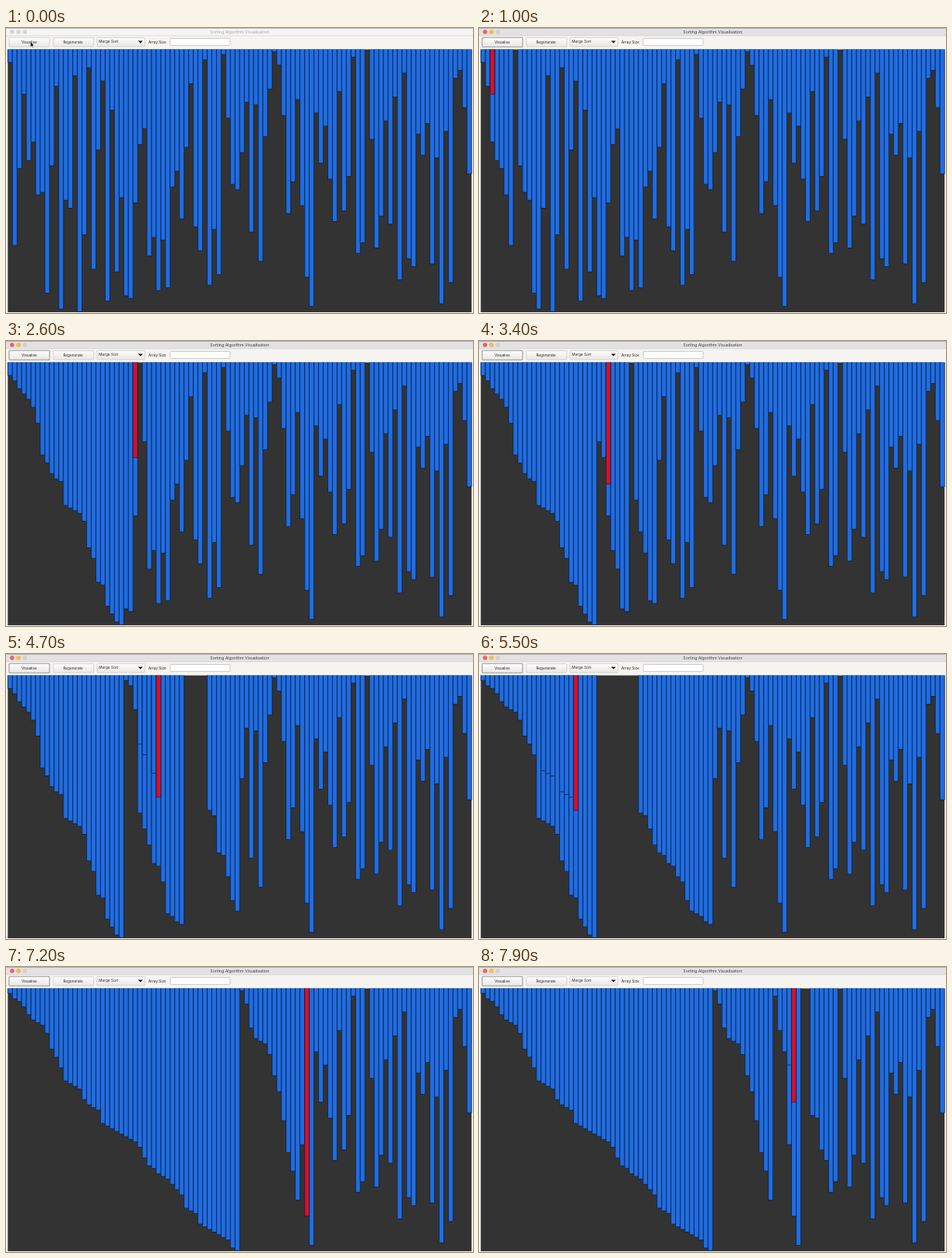
An HTML page with a canvas for the animation above (8 s loop, 600x366 px).

```html
<!DOCTYPE html>
<html lang="en">
<head>
<meta charset="utf-8">
<title>Sorting Algorithm Visualisation</title>
<style>
  html, body { margin: 0; width: 100%; height: 100%; overflow: hidden; background: #f3f2f0; }
  svg, canvas { position: absolute; left: 0; top: 0; width: 600px; height: 366px; display: block; }
  text { font: 4.7px Inter, Roboto, sans-serif; fill: #222; }
  .title { font-size: 5.25px; text-anchor: middle; fill: #3c3c3c; }
  .mid { text-anchor: middle; }
  .btn { fill: url(#face); stroke: #c9c8c6; stroke-width: .7; }
  .idle .title { fill: #a5a5a5; }
  .idle .lights circle { fill: #d6d5d6; stroke: #c4c3c4; }
  .idle #bar { fill: #f6f5f6; }
  .focus #go { stroke: #999; stroke-width: 1.1; }
  .away #cursor { display: none; }
</style>
</head>
<body>
<svg id="win" viewBox="0 0 600 366">
  <linearGradient id="face" x2="0" y2="1">
    <stop stop-color="#fdfdfd"/><stop offset="1" stop-color="#e8e7e5"/>
  </linearGradient>
  <rect width="600" height="366" fill="#f5f4f1"/>
  <rect id="bar" width="600" height="10" fill="#e3e1e3"/>
  <path d="M0 .3H600" stroke="#777" stroke-width=".6"/>
  <path d="M0 10H600" stroke="#cfcdcf" stroke-width=".6"/>
  <g class="lights" stroke-width=".4">
    <circle cx="7.8" cy="5" r="2.5" fill="#fc5b57" stroke="#df4744"/>
    <circle cx="16" cy="5" r="2.5" fill="#fdbc40" stroke="#dea035"/>
    <circle cx="24.2" cy="5" r="2.5" fill="#d3d1d3" stroke="#c3c1c3"/>
  </g>
  <text class="title" x="300.3" y="7">Sorting Algorithm Visualisation</text>
  <rect id="go" class="btn" x="4" y="12.2" width="52" height="12" rx="1"/>
  <text class="mid" x="29.8" y="19.9">Visualise</text>
  <rect class="btn" x="60.8" y="12.6" width="52" height="11.4" rx="1"/>
  <text class="mid" x="86.1" y="19.9">Regenerate</text>
  <rect class="btn" x="117" y="12.4" width="61.5" height="11.4" rx="1"/>
  <text x="119.3" y="19.4">Merge Sort</text>
  <path d="M169.7 16.4h6l-3 3z" fill="#111"/>
  <text x="183" y="19.9">Array Size</text>
  <rect x="211" y="13.4" width="77" height="9" rx="1" fill="#fff" stroke="#bbb" stroke-width=".8"/>
  <path id="cursor" d="M31.4 17.6v7l1.7-1.5 1 2.2 1-.5-1-2.1h2.2z" fill="#111" stroke="#fff" stroke-width=".4"/>
</svg>
<canvas id="plot" width="600" height="366"></canvas>
<script>
// The array being sorted; every later bar position follows from it
const values = [
  5, 74, 45, 17, 42, 35, 55, 54, 92, 44, 14, 98, 57, 60, 10, 99, 70, 7, 83, 38,
  12, 95, 23, 84, 56, 93, 94, 58, 36, 30, 78, 71, 91, 72, 90, 52, 46, 64, 37, 13,
  67, 76, 4, 89, 68, 85, 2, 26, 51, 53, 39, 20, 69, 21, 80, 33, 15, 1, 6, 25,
  62, 50, 19, 59, 86, 97, 24, 43, 29, 49, 65, 16, 61, 48, 3, 77, 73, 0, 34, 75,
  63, 27, 66, 18, 87, 9, 79, 82, 32, 40, 28, 81, 41, 96, 31, 88, 11, 8, 22, 47];
// [time in ms, merge writes done]
const pace = [[300, 0], [1800, 84], [3400, 157], [5500, 257], [6400, 296], [7900, 372]];
const pauses = [500, 1200, 2100];
const LOOP = 8000, TICK = 100;
const LEFT = 2.3, TOP = 27.5, BOTTOM = 365, STEP = 5.959, UNIT = 3.405, BASE = 27.2;
const BLUE = '#206de2', RED = '#d4112b', EDGE = '#0a1a36';

const win = document.getElementById('win');
const ctx = document.getElementById('plot').getContext('2d');

// One state per write: bars still waiting (low) and bars already placed (top)
const states = [{ low: values, top: [], marks: [], red: -1 }];
const list = values.slice();

function sort(lo, hi) {
  if (lo >= hi) return;
  const mid = (lo + hi) >> 1;
  sort(lo, mid);
  sort(mid + 1, hi);
  const low = list.slice(), top = [], marks = [];
  let i = lo, j = mid + 1;
  for (let k = lo; k <= hi; k++) {
    const from = j > hi || (i <= mid && list[i] < list[j]) ? i++ : j++;
    low[from] = 0;
    top[k] = list[from];
    marks[k] = states.length % 4 !== 1;
    states.push({ low: low.slice(), top: top.slice(), marks: marks.slice(), red: k });
  }
  for (let k = lo; k <= hi; k++) list[k] = top[k];
}
sort(0, values.length - 1);

function writesAt(t) {
  const n = pace.findIndex(p => p[0] >= t);
  if (n < 1) return 0;
  const [t0, w0] = pace[n - 1], [t1, w1] = pace[n];
  return Math.round(w0 + (w1 - w0) * (t - t0) / (t1 - t0));
}

function bar(i, v, color) {
  if (!v) return;
  const x = LEFT + i * STEP, y = BASE + UNIT * v;
  ctx.fillStyle = color;
  ctx.fillRect(x, TOP, STEP, y - TOP);
  ctx.beginPath();
  ctx.moveTo(x, TOP);
  ctx.lineTo(x, y);
  ctx.lineTo(x + STEP, y);
  ctx.lineTo(x + STEP, TOP);
  ctx.stroke();
}

function draw(s) {
  ctx.clearRect(0, 0, 600, 366);
  ctx.fillStyle = '#333';
  ctx.fillRect(LEFT, TOP, values.length * STEP, BOTTOM - TOP);
  ctx.strokeStyle = EDGE;
  ctx.lineWidth = .7;
  s.low.forEach((v, i) => {
    bar(i, v, BLUE);
    const placed = s.top[i];
    if (i !== s.red && (placed > v || s.marks[i])) bar(i, placed, BLUE);
  });
  if (s.red >= 0) bar(s.red, s.top[s.red], RED);
}

let last = -1;
function frame(now) {
  let t = Math.floor(now % LOOP / TICK) * TICK;
  if (pauses.includes(t)) t -= TICK;
  if (t !== last) {
    last = t;
    win.classList.toggle('idle', t < 300);
    win.classList.toggle('focus', t >= 100);
    win.classList.toggle('away', t >= 600);
    draw(states[writesAt(t)]);
  }
  requestAnimationFrame(frame);
}
frame(0);
</script>
</body>
</html>
```
